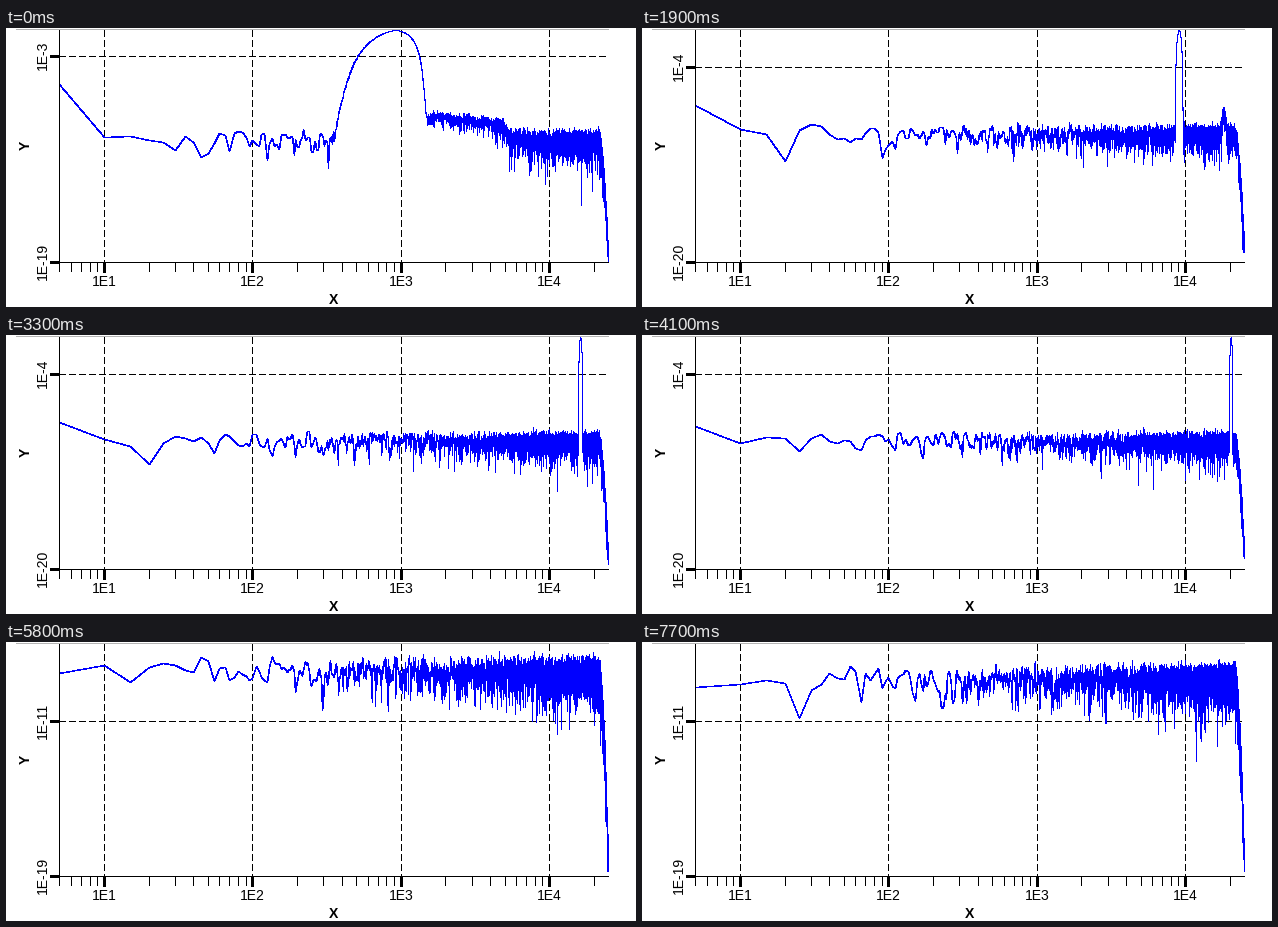
These frames come from a looping animation (630x279 px, 8 s). A matplotlib script:

```python
import numpy as np
import matplotlib
import matplotlib.pyplot as plt
from matplotlib.animation import FuncAnimation
from matplotlib.patches import Rectangle

matplotlib.rcParams["font.family"] = "Liberation Sans"
matplotlib.rcParams["path.simplify"] = False
matplotlib.rcParams["lines.scale_dashes"] = False

W, H, DPI = 630, 279, 100
PX = 72 / DPI
LEFT, RIGHT, TOP, BOTTOM = 53, 603, 2, 234
DECADE, X10 = 148.4, 98
STEP_MS, STEPS = 100, 80

# A spectrum stays for 3 steps, a few only for 2
COUNT = 29
SHORT = (2, 6, 9, 14, 18, 22, 25)
HOLD = np.array([2 if n in SHORT else 3 for n in range(COUNT)])
START = np.cumsum(HOLD) - HOLD
SHOWN = np.repeat(np.arange(COUNT), HOLD)

freq = 5.0 * np.arange(1, 5001)
roll = np.clip((freq - 21500) / 3500, 0, None) ** 1.7


def to_x(f):
    return X10 + DECADE * np.log10(f / 10) + 0.5


def to_y(level, lo, hi):
    return BOTTOM - (BOTTOM - TOP) * (level - lo) / (hi - lo) + 0.5


def pixel(v):
    return np.floor(v) + 0.5


def noise(rng):
    """Complex noise of unit power, smoothed by a Hann window."""
    z = rng.normal(size=(2, freq.size + 2))
    z = z[0] + 1j * z[1]
    return (0.5 * z[1:-1] - 0.25 * (z[:-2] + z[2:])) / np.sqrt(0.75)


def sweep(t, rng):
    """Amplitude of the rising tone and its fading harmonics."""
    fc = np.interp(t, [0, 1.1, 2.7, 4.1, 5.0], [920, 5000, 13100, 20250, 24850])
    u = np.minimum(np.abs(freq - fc) / 550, 4)
    main = 10 ** (-1.02 - 2.7 * u ** 2 - 4.4 * u ** 7.2)
    side = 0
    for k in range(2, 6):
        d = np.minimum(np.abs(freq - k * fc) / 800, 4)
        side = side + 10 ** (-7.2 - 0.2 * k - 1.5 * d ** 2)
    return np.sqrt(main) + np.sqrt(side) * (0.85 + 0.4 * noise(rng))


def tail(n):
    """log10 power at the end of the band; it also sets the axis minimum."""
    if n > 17:
        return -19.1 - 0.6 * np.cos(2 * np.pi * (3 * (n - 20) / 7 - 0.07))
    return np.interp(n, [0, 1, 2, 4, 5, 6, 7, 12, 13, 15, 16],
                     [-18.98, -18.75, -19.2, -20.02, -19.75, -20.3,
                      -19.2, -19.6, -20.6, -19.1, -18.84])


def spectrum(n):
    """Pixel heights and axis limits of spectrum n."""
    rng = np.random.default_rng(n + 40)
    t = START[n] * STEP_MS / 1000
    base = np.interp(n, [16, 19, 28], [-9.4, -8.2, -8.65])
    end = tail(n)
    z = noise(rng) * 10 ** (base / 2)
    if t < 5.1:
        z = z + sweep(t, rng)
    level = np.log10(np.abs(z) ** 2) - (base - end) * roll
    if n < 18:
        level[0] = base + 4.2 * np.exp(-n / 11)
    level = np.maximum(level, end)
    level[-1] = end
    lo, hi = np.floor(end), np.ceil(level.max())
    return pixel(to_y(level, lo, hi)), int(lo), int(hi)


fig = plt.figure(figsize=(W / DPI, H / DPI), dpi=DPI, facecolor="white")
ax = fig.add_axes([0, 0, 1, 1])
ax.set_xlim(0, W)
ax.set_ylim(H, 0)
ax.axis("off")


def box(x, y, w, h, color="black"):
    return ax.add_patch(Rectangle((x, y), w, h, fc=color, lw=0,
                                  antialiased=False, zorder=4))


def hairline(xs, ys, color="black", z=1, **style):
    return ax.plot(xs, ys, color=color, lw=0.5 * PX, antialiased=False,
                   snap=False, zorder=z, **style)[0]


def dashed(xs, ys):
    return hairline(xs, ys, dashes=(6.2 * PX, 3.2 * PX), dash_capstyle="butt")


def label(x, y, s, rotation=0, weight="normal"):
    return ax.text(x, y, s, fontsize=14 * PX, rotation=rotation, weight=weight,
                   rotation_mode="anchor", ha="center", va="baseline")


box(10, 1, RIGHT - 10, 1, "#b4b4b4")
box(LEFT, TOP, 1, BOTTOM - TOP)
box(LEFT, BOTTOM, RIGHT - LEFT, 1)
box(44, BOTTOM - 1, 9, 3)

for p in range(5):
    for m in range(1, 10):
        f = m * 10 ** p
        if not 5 <= f <= 25000:
            continue
        col = int(to_x(f))
        if m > 1:
            box(col, BOTTOM + 1, 1, 9)
        else:
            box(col - 1, BOTTOM + 1, 3, 10)
            dashed([col + 0.5] * 2, [TOP, BOTTOM])
            label(col + 0.5, 258, f"1E{p}")

label(327.5, 276, "X", weight="bold")
label(24, 117, "Y", 90, "bold")

grid = dashed([LEFT, RIGHT - 2], [0, 0])
tick = box(44, 0, 9, 3)
upper = label(41, 0, "", 90)
lower = label(41, BOTTOM - 1, "", 90)
curve = hairline([], [], "#0000ff", 3)
curve.set_clip_path(Rectangle((LEFT, TOP), RIGHT - LEFT, BOTTOM - TOP + 1,
                              transform=ax.transData))


def draw(i):
    y, lo, hi = spectrum(SHOWN[i])
    curve.set_data(pixel(to_x(freq)), y)
    mark = lo + (8 if hi - lo <= 16 else 16)
    row = int(to_y(mark, lo, hi))
    grid.set_ydata([row + 0.5] * 2)
    tick.set_y(row - 1)
    upper.set_position((41, row - 0.5))
    upper.set_text(f"1E{mark}")
    lower.set_text(f"1E{lo}")
    return curve, grid, tick, upper, lower


anim = FuncAnimation(fig, draw, frames=STEPS, interval=STEP_MS,
                     repeat=True, repeat_delay=0, blit=False)
plt.show()
```
